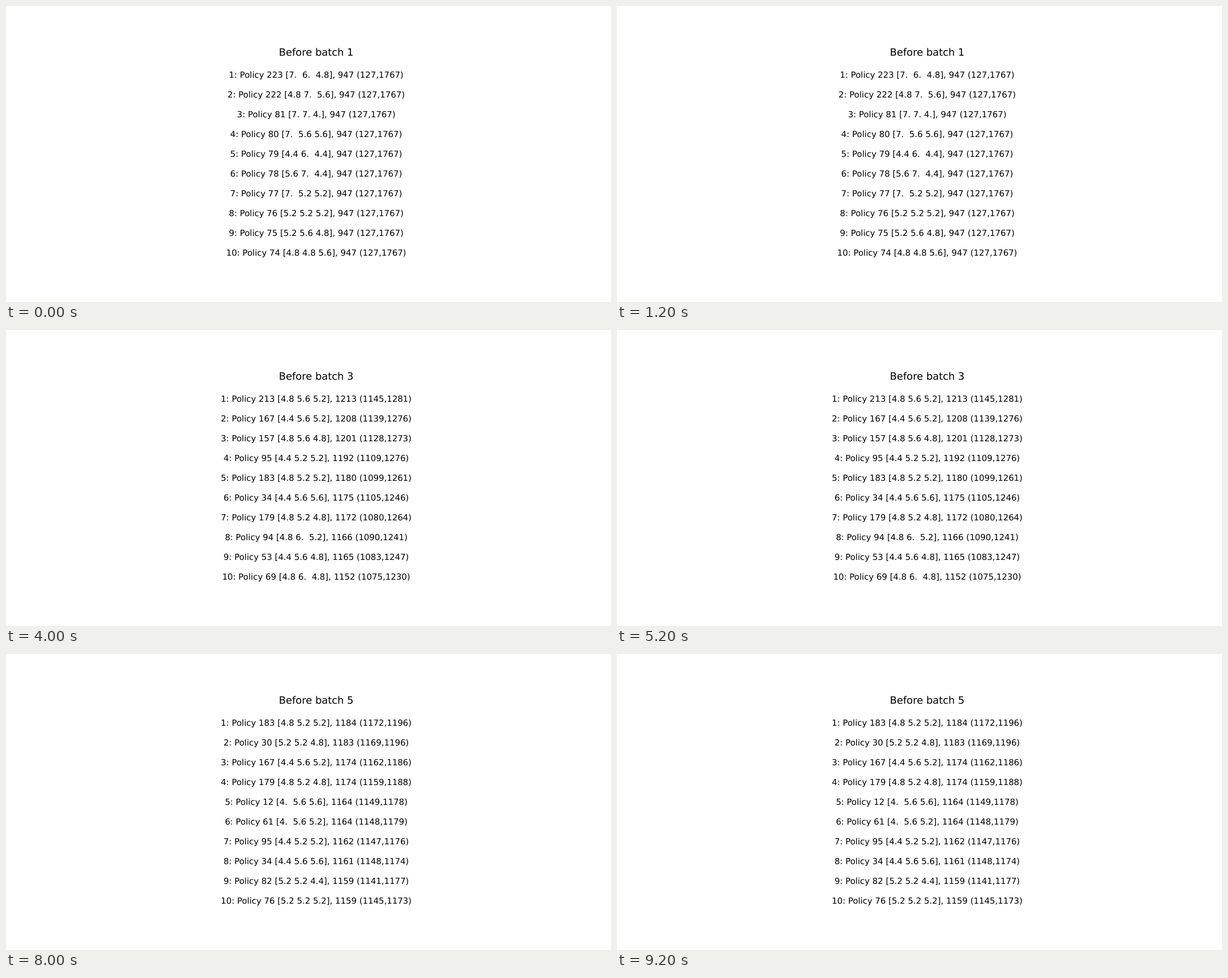
Animation of 1068x524 px, one loop 10 s. Source, as an HTML page:

```html
<!DOCTYPE html>
<html lang="en">
<head>
<meta charset="utf-8">
<title>Policy ranking</title>
<style>
  html, body { margin: 0; width: 100%; height: 100%; overflow: hidden; background: #fff; }
  svg { display: block; width: 100%; height: 100%; }
  text {
    font: 14.92px "DejaVu Sans", sans-serif;
    text-anchor: middle;
    text-rendering: geometricPrecision;
    white-space: pre;
  }
  .title { font-size: 17.9px; }
</style>
</head>
<body>
<svg id="stage" viewBox="0 0 1068 524"></svg>
<script>
const CENTER = 547.6, TITLE_Y = 87.7, FIRST_Y = 126.7, PITCH = 35;
const HOLD = 2000, ROWS = 10;

// Parameters of each policy
const policies = {
  9: [4, 6, 5.6], 12: [4, 5.6, 5.6], 30: [5.2, 5.2, 4.8], 34: [4.4, 5.6, 5.6],
  35: [4.4, 5.2, 5.6], 53: [4.4, 5.6, 4.8], 57: [4.4, 6, 5.6], 61: [4, 5.6, 5.2],
  69: [4.8, 6, 4.8], 74: [4.8, 4.8, 5.6], 75: [5.2, 5.6, 4.8], 76: [5.2, 5.2, 5.2],
  77: [7, 5.2, 5.2], 78: [5.6, 7, 4.4], 79: [4.4, 6, 4.4], 80: [7, 5.6, 5.6],
  81: [7, 7, 4], 82: [5.2, 5.2, 4.4], 94: [4.8, 6, 5.2], 95: [4.4, 5.2, 5.2],
  122: [4, 5.2, 5.6], 129: [3.6, 6, 5.6], 157: [4.8, 5.6, 4.8], 167: [4.4, 5.6, 5.2],
  179: [4.8, 5.2, 4.8], 183: [4.8, 5.2, 5.2], 213: [4.8, 5.6, 5.2],
  222: [4.8, 7, 5.6], 223: [7, 6, 4.8]
};

// The first batch shares one prior interval: two newest policies, then 81 downwards
const prior = Array.from({ length: ROWS }, (_, i) => [i < 2 ? 223 - i : 83 - i, 127, 1767]);

// Ranked [policy, low, high]; the score is the middle of the interval
const batches = [
  prior,
  [[12, 963, 1385], [34, 975, 1347], [9, 926.8, 1362], [167, 892.8, 1376], [57, 896, 1372],
   [61, 878, 1384], [122, 858, 1395], [129, 827, 1401], [35, 898, 1328], [213, 871, 1353]],
  [[213, 1145, 1281], [167, 1139, 1276], [157, 1128, 1273], [95, 1108.8, 1276], [183, 1099, 1261],
   [34, 1104.8, 1246], [179, 1080, 1264], [94, 1090, 1241], [53, 1083, 1247], [69, 1074.8, 1230]],
  [[167, 1173.8, 1229], [183, 1172, 1229], [179, 1164, 1232], [95, 1163.8, 1231], [157, 1165, 1220],
   [213, 1163, 1217], [35, 1145, 1207], [53, 1141, 1206], [34, 1143.8, 1203], [12, 1137.8, 1205]],
  [[183, 1172, 1196], [30, 1169, 1196], [167, 1162, 1186], [179, 1159, 1188], [12, 1149, 1178],
   [61, 1148, 1179], [95, 1147, 1176], [34, 1148, 1174], [82, 1141, 1177], [76, 1145, 1173]]
];

// Whole values get a bare point, padded when any neighbour has a decimal
function formatVector(values) {
  const whole = values.every(Number.isInteger) ? "." : ". ";
  return `[${values.map(v => Number.isInteger(v) ? v + whole : v).join(" ")}]`;
}

function formatRow([id, low, high], i) {
  const [score, from, to] = [(low + high) / 2, low, high].map(Math.round);
  return `${i + 1}: Policy ${id} ${formatVector(policies[id])}, ${score} (${from},${to})`;
}

const stage = document.getElementById("stage");

function addText(y, className = "") {
  const el = document.createElementNS(stage.namespaceURI, "text");
  el.setAttribute("x", CENTER);
  el.setAttribute("y", y);
  el.setAttribute("class", className);
  return stage.appendChild(el);
}

const title = addText(TITLE_Y, "title");
const rows = prior.map((_, i) => addText(FIRST_Y + PITCH * i));
let shown = -1;

function draw(time) {
  const index = Math.floor(time / HOLD) % batches.length;
  if (index === shown) return;
  shown = index;
  title.textContent = `Before batch ${index + 1}`;
  batches[index].forEach((entry, i) => { rows[i].textContent = formatRow(entry, i); });
}

const start = performance.now();
function tick() {
  draw(performance.now() - start);
  requestAnimationFrame(tick);
}
tick();
</script>
</body>
</html>
```
